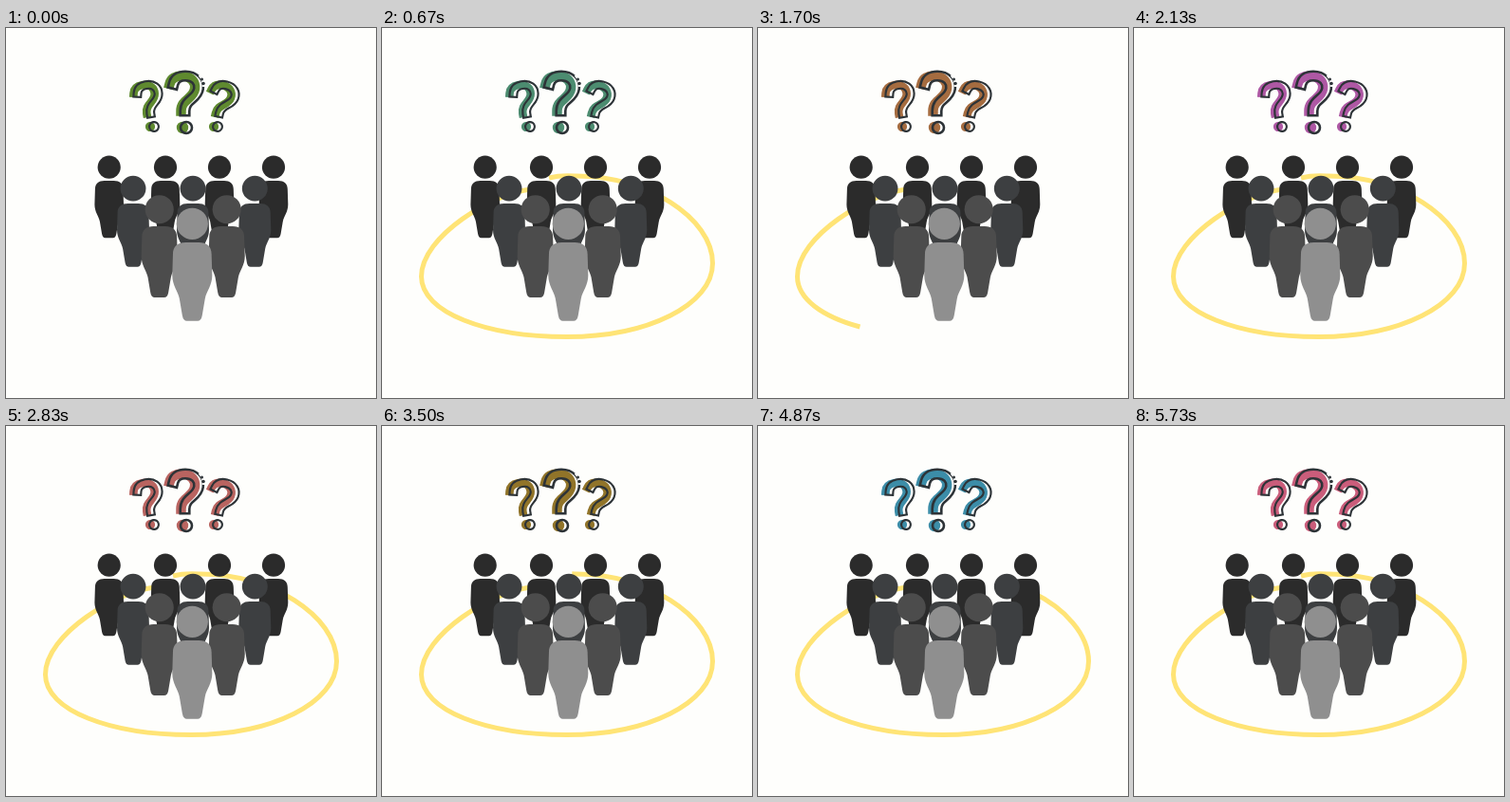
An HTML page for the animation above (5.76 s loop, 390 px wide and 390 px high).

```html
<!DOCTYPE html>
<html lang="en">
<head>
<meta charset="utf-8">
<title>Crowd with questions</title>
<style>
  html, body { margin: 0; width: 100%; height: 100%; overflow: hidden; background: #fefefc; }
  svg { display: block; width: 100vw; height: 100vh; }
</style>
</head>
<body>
<svg viewBox="0 0 390 390">
  <defs>
    <g id="person">
      <circle cy="-14.3" r="12.1"/>
      <path d="M-14.8 9C-14.8 3-11 0-5 0H5C11 0 14.800 3 14.800 9L15.300 25C15.300 33 11 37 9.800 43L7.600 56Q6.900 60.200 4 60.200H-4Q-6.900 60.200-7.600 56L-9.800 43C-11 37-15.300 33-15.300 25Z"/>
    </g>
    <path id="hook" fill="none" stroke-linecap="square"
      d="M-13.500 -46C-12 -52-7-54.500-1-54.500C9-54.500 14-48 13-41C11.500-30-1.500-30-1.500-17.500"/>
    <mask id="rim" maskUnits="userSpaceOnUse" x="-30" y="-70" width="60" height="85">
      <use href="#hook" stroke="#fff" stroke-width="12.2"/>
      <use href="#hook" stroke="#000" stroke-width="7"/>
    </mask>
    <g id="outline">
      <rect x="-30" y="-70" width="60" height="85" fill="#2d3337" mask="url(#rim)"/>
      <circle r="6" fill="none" stroke="#2d3337" stroke-width="2.6"/>
    </g>
    <g id="tint">
      <use href="#hook" stroke="currentColor" stroke-width="10.5"/>
      <circle r="6.2" fill="currentColor"/>
    </g>
  </defs>
  <rect width="390" height="390" fill="#fefefc"/>
  <path id="ring" fill="none" stroke="#ffe476" stroke-width="5" pathLength="1"
    d="M157 170C118 174 41.500 219 41.500 262C41.500 300 110 325.500 195 325.500C280 325.500 348.500 292 348.500 248C348.500 200 278 155 203 156Q188 155 176 158"/>
  <g id="crowd"></g>
  <g id="marks"></g>
  <path d="M204.500 49Q209 54 209 62" fill="none" stroke="#fefefc" stroke-width="4.500"/>
  <g fill="#2d3337">
    <circle cx="206.500" cy="54" r="1.500"/>
    <circle cx="208" cy="58.500" r="1.800"/>
  </g>
</svg>
<script>
const LOOP = 5760;
const RING_PERIOD = 1440, DRAW_START = 70, DRAW_TIME = 570;
const TINT_PERIOD = 588;

// Each row: fill, scale, shoulder height, centres
const rows = [
  ['#2b2b2b', 1, 161, [108.700, 168, 225, 282]],
  ['#3d3f41', 1.11, 185, [134, 197, 262.300]],
  ['#4c4c4c', 1.245, 209, [161.700, 232.700]],
  ['#8f8f8f', 1.375, 226, [196.300]]
];

// Each mark: dot position, scale, tilt
const marks = [[156, 104, .82, -10], [190, 105, 1, 0], [223, 104, .82, 13]];

// Phase in ms and colour, cycling
const tints = [
  [0, [95, 138, 46]],
  [154, [59, 141, 168]],
  [166, [59, 141, 168]],
  [366, [174, 88, 165]],
  [438, [202, 93, 124]],
  [560, [150, 114, 40]],
  [572, [95, 138, 46]],
  [588, [95, 138, 46]]
];

const byId = id => document.getElementById(id);
const ring = byId('ring'), markLayer = byId('marks');

byId('crowd').innerHTML = rows.map(([fill, size, y, xs]) =>
  xs.map(x => `<use href="#person" fill="${fill}" transform="translate(${x} ${y}) scale(${size})"/>`).join('')
).join('');

const placeMark = (id, dx) => ([x, y, size, tilt]) =>
  `<use href="#${id}" transform="translate(${x + dx} ${y}) rotate(${tilt}) scale(${size})"/>`;
markLayer.innerHTML =
  marks.map(placeMark('tint', -4)).join('') + marks.map(placeMark('outline', 0)).join('');

function tintAt(phase) {
  const next = Math.max(1, tints.findIndex(([at]) => at >= phase));
  const [t0, from] = tints[next - 1], [t1, to] = tints[next];
  const mix = (phase - t0) / (t1 - t0);
  return `rgb(${from.map((c, i) => Math.round(c + (to[i] - c) * mix))})`;
}

function render(time) {
  const t = time % LOOP;
  const drawn = Math.min(1, Math.max(0, (t % RING_PERIOD - DRAW_START) / DRAW_TIME));
  ring.style.display = drawn > 0 ? '' : 'none';
  ring.setAttribute('stroke-dasharray', drawn < 1 ? `${drawn} 2` : 'none');
  markLayer.setAttribute('color', tintAt(t % TINT_PERIOD));
}

const start = performance.now();
function tick() {
  render(performance.now() - start);
  requestAnimationFrame(tick);
}
tick();
</script>
</body>
</html>
```
